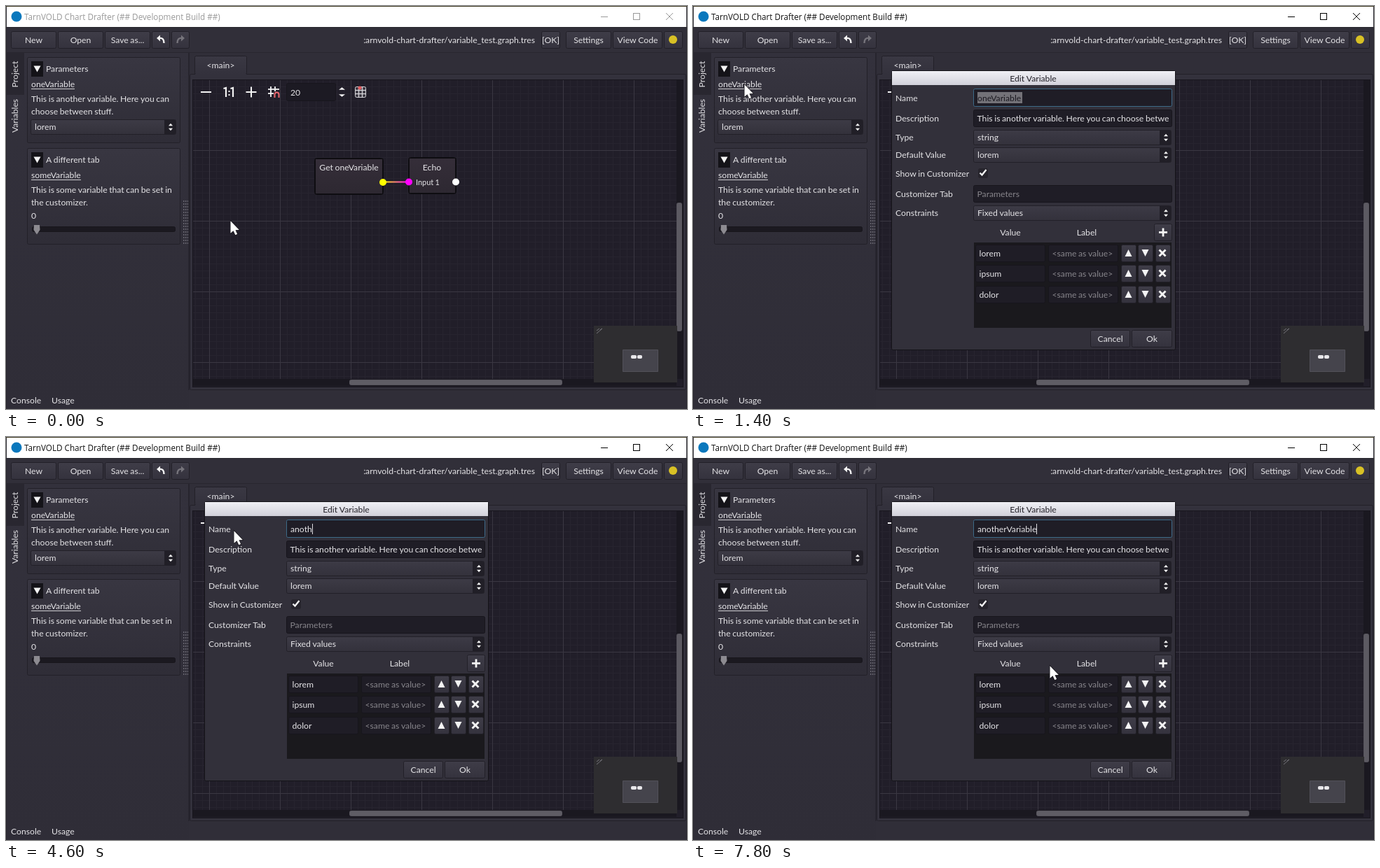
These frames come from a looping animation (972 px wide and 576 px high, 8000 ms). An HTML page with a canvas:

```html
<!DOCTYPE html>
<html lang="en">
<head>
<meta charset="utf-8">
<title>Edit Variable</title>
<style>
html, body { margin: 0; width: 100%; height: 100%; overflow: hidden; background: #302e37; }
canvas { display: block; }
</style>
</head>
<body>
<canvas id="stage" width="972" height="576"></canvas>
<script>
const ctx = document.getElementById('stage').getContext('2d');
const LOOP = 8000;
const LATO = 'Lato, sans-serif';
const C = {
  text: '#e4e3e6', dim: '#87858b', white: '#f4f4f4', bg: '#302e38', panel: '#33313c',
  edge: '#222028', field: '#1f1d26', graph: '#211e29'
};

// [time, value] steps
const MOUSE = [
  [0, [320, 307]], [200, [256, 268]], [400, [115, 157]], [600, [76, 119]],
  [800, [73, 112]], [1800, [102, 120]], [2000, [325, 134]],
  [7400, [330, 139]], [7600, [399, 224]], [7800, [509, 327]]
];
const TYPED = [
  [2200, 1], [2800, 2], [3600, 3], [4200, 4], [4600, 5], [4800, 8],
  [5200, 9], [6600, 10], [7000, 11], [7200, 12], [7400, 15]
];
const NEW_NAME = 'anotherVariable';

function stepAt(steps, t) {
  let value = null;
  for (const [time, v] of steps) if (t >= time) value = v;
  return value;
}

function rect(x, y, w, h, fill) {
  ctx.fillStyle = fill;
  ctx.fillRect(x, y, w, h);
}

function box(x, y, w, h, fill, border = C.edge, r = 2) {
  ctx.beginPath();
  ctx.roundRect(x + .5, y + .5, w - 1, h - 1, r);
  ctx.fillStyle = fill;
  ctx.fill();
  ctx.strokeStyle = border;
  ctx.lineWidth = 1;
  ctx.stroke();
}

function fade(y, h, top, bottom) {
  const g = ctx.createLinearGradient(0, y, 0, y + h);
  g.addColorStop(0, top);
  g.addColorStop(1, bottom);
  return g;
}

function text(str, x, y, color = C.text, align = 'left', size = 12.2, font = LATO) {
  ctx.font = `${size}px ${font}`;
  ctx.wordSpacing = font === LATO ? '-0.5px' : '0px';
  ctx.textAlign = align;
  ctx.fillStyle = color;
  ctx.fillText(str, x, y);
}

function line(points, color, width = 1, close = false) {
  ctx.beginPath();
  points.forEach(([x, y], i) => i ? ctx.lineTo(x, y) : ctx.moveTo(x, y));
  if (close) ctx.closePath();
  ctx.strokeStyle = color;
  ctx.lineWidth = width;
  ctx.stroke();
}

function poly(points, color) {
  ctx.beginPath();
  points.forEach(([x, y]) => ctx.lineTo(x, y));
  ctx.closePath();
  ctx.fillStyle = color;
  ctx.fill();
}

function dot(x, y, r, color) {
  ctx.beginPath();
  ctx.arc(x, y, r, 0, Math.PI * 2);
  ctx.fillStyle = color;
  ctx.fill();
}

// dir 1 points down, -1 up
function triangle(x, y, w, h, dir, color = C.white) {
  poly([[x - w, y - h * dir], [x + w, y - h * dir], [x, y + h * dir]], color);
}

function plus(x, y, r, width = 2) {
  line([[x - r, y], [x + r, y]], C.white, width);
  line([[x, y - r], [x, y + r]], C.white, width);
}

function button(x, y, w, h, label) {
  box(x, y, w, h, fade(y, h, '#3f3d48', '#34323d'));
  if (label) text(label, x + w / 2, y + h / 2 + 4, C.text, 'center');
}

function spinArrows(x, y, w = 3, gap = 3.5) {
  triangle(x, y - gap, w, 1.8, -1);
  triangle(x, y + gap, w, 1.8, 1);
}

function dropdown(x, y, w, h, label) {
  box(x, y, w, h, fade(y, h, '#3d3b46', '#33313b'));
  rect(x + w - 17, y + 1, 16, h - 2, '#211f27');
  spinArrows(x + w - 8, y + h / 2);
  text(label, x + 6, y + h / 2 + 4);
}

function titleBar(active) {
  const ink = active ? '#000' : '#999';
  rect(0, 0, 972, 1, '#403a22');
  rect(1, 1, 970, 29, '#fff');
  dot(15, 15, 7.5, '#0a78bd');
  text('TarnVOLD Chart Drafter (## Development Build ##)', 26, 20, active ? '#111' : '#999',
    'left', 11.7, '"Open Sans", sans-serif');
  line([[849, 15.5], [859, 15.5]], ink);
  ctx.strokeRect(895.5, 10.5, 9, 9);
  line([[942, 10], [952, 20]], ink);
  line([[952, 10], [942, 20]], ink);
}

function curvedArrow(x, dir, color) {
  poly([[x - 6 * dir, 46], [x - dir, 41.5], [x - dir, 50.5]], color);
  ctx.beginPath();
  ctx.moveTo(x - 2 * dir, 46);
  ctx.quadraticCurveTo(x + 4.5 * dir, 45, x + 4.5 * dir, 53);
  ctx.strokeStyle = color;
  ctx.lineWidth = 2.4;
  ctx.stroke();
}

function toolbar() {
  rect(1, 30, 970, 37, '#312f39');
  rect(1, 30, 970, 1, '#25232a');
  rect(1, 66, 970, 1, '#28262f');
  button(7, 36, 65, 25, 'New');
  button(74, 36, 65, 25, 'Open');
  button(141, 36, 65, 25, 'Save as...');
  button(208, 36, 26, 25);
  button(236, 36, 26, 25);
  curvedArrow(221, 1, C.white);
  curvedArrow(249, -1, '#77757c');
  ctx.save();
  ctx.beginPath();
  ctx.rect(511, 36, 250, 26);
  ctx.clip();
  text('/tarnvold-chart-drafter/variable_test.graph.tres', 755, 53, C.text, 'right');
  ctx.restore();
  button(764, 36, 27, 25, '[OK]');
  button(799, 36, 65, 25, 'Settings');
  button(866, 36, 71, 25, 'View Code');
  button(939, 36, 27, 25);
  dot(952, 48, 6, '#d8c125');
}

function section(y, h, title) {
  box(30, y, 219, h, fade(y, h, '#383641', '#2f2d37'));
  rect(36, y + 6, 17, 22, '#141318');
  triangle(44.5, y + 17, 5, 4.5, 1);
  text(title, 57, y + 21);
}

function link(str, y) {
  text(str, 36, y);
  rect(36, y + 2, Math.round(ctx.measureText(str).width), 1, '#cfced2');
}

function sideTab(str, y) {
  ctx.save();
  ctx.translate(17, y);
  ctx.rotate(-Math.PI / 2);
  text(str, 0, 0, C.text, 'center');
  ctx.restore();
}

function sidebar() {
  rect(1, 67, 260, 509, fade(67, 509, '#33313c', '#2f2d37'));
  rect(1, 67, 25, 60, '#292730');
  sideTab('Project', 97.5);
  sideTab('Variables', 157);

  section(73, 123, 'Parameters');
  link('oneVariable', 116);
  text('This is another variable. Here you can', 36, 137);
  text('choose between stuff.', 36, 155);
  dropdown(35, 162, 208, 22, 'lorem');

  section(203, 138, 'A different tab');
  link('someVariable', 246);
  text('This is some variable that can be set in', 36, 267);
  text('the customizer.', 36, 285);
  text('0', 36, 304);
  box(37, 315, 205, 8, '#1b1920', '#18161c');
  poly([[40, 313], [48, 313], [48.5, 320], [44, 326.5], [39.5, 320]], '#8d8b91');

  for (let y = 278; y < 342; y += 4)
    for (let x = 253; x < 260; x += 3) rect(x, y, 1.5, 2, '#696771');

  text('Console', 7, 568);
  text('Usage', 65, 568);
}

function grid() {
  const cell = 10.1;
  for (const major of [false, true]) {
    const step = major ? cell * 10 : cell;
    const color = major ? '#3a3742' : '#27242f';
    for (let x = 290 - (major ? 0 : cell * 2); x < 957; x += step) rect(Math.round(x), 106, 1, 427, color);
    for (let y = 206 - (major ? 0 : cell * 9); y < 533; y += step) rect(267, Math.round(y), 690, 1, color);
  }
}

function node(x, y, w, h, title, titleX) {
  box(x, y, w, h, fade(y, h, '#352e39', '#2d2831'), '#0e0d11', 3);
  ctx.strokeRect(x + 1.5, y + 1.5, w - 3, h - 3);
  text(title, titleX, 235, C.text, 'center');
}

function graphIcons() {
  rect(278, 122, 15, 2, C.white);
  plus(350, 123, 7.5);

  // 1:1 zoom
  for (const x of [314, 324]) line([[x - 3.5, 118], [x, 117], [x, 130]], C.white, 2.2);
  for (const y of [121, 126]) rect(317.5, y, 2, 2, C.white);

  // snap grid with magnet
  for (const p of [378, 384]) line([[p, 115], [p, 130]], C.white, 1.8);
  for (const p of [119, 125]) line([[374, p], [390, p]], C.white, 1.8);
  rect(382, 122, 9, 9, C.graph);
  ctx.beginPath();
  ctx.moveTo(383.5, 131);
  ctx.lineTo(383.5, 126.5);
  ctx.arc(386.5, 126.5, 3, Math.PI, 0);
  ctx.lineTo(389.5, 131);
  ctx.strokeStyle = '#ed6870';
  ctx.lineWidth = 2;
  ctx.stroke();

  box(400, 110, 71, 26, '#1c1a23', '#18161d');
  text('20', 406, 127.5);
  spinArrows(479.5, 123, 4.5, 5);

  // map icon
  box(498, 115, 16, 16, '#3a3741', '#d8d7da');
  for (const x of [503.5, 508.5]) line([[x, 115], [x, 131]], '#d8d7da', 1.3);
  for (const y of [120.5, 125.5]) line([[498, y], [514, y]], '#d8d7da', 1.3);
  dot(505, 117, 2.5, '#e65f62');
}

function graphArea() {
  rect(261, 67, 710, 509, C.bg);
  rect(260, 67, 2, 482, '#27252e');
  box(262, 97, 709, 452, C.panel);
  box(269, 71, 75, 27, fade(71, 27, '#3a3843', C.panel));
  rect(270, 97, 73, 2, C.panel);
  text('<main>', 306.5, 89, C.text, 'center');

  rect(266, 105, 701, 440, '#18161d');
  rect(267, 106, 699, 438, C.graph);
  grid();

  const wire = ctx.createLinearGradient(538, 0, 575, 0);
  wire.addColorStop(0, '#ffff00');
  wire.addColorStop(1, '#ff00ff');
  node(440, 217, 99, 53, 'Get oneVariable', 489.5);
  node(574, 216, 69, 53, 'Echo', 608);
  line([[538, 251.5], [575, 251.5]], wire, 1.8);
  dot(538, 252, 5, '#ffff00');
  dot(575, 251.5, 5, '#ff00ff');
  dot(642, 251.5, 5, '#fff');
  text('Input 1', 585, 255.5, C.text, 'left', 10.9);

  graphIcons();

  rect(957, 106, 9, 427, '#1a1820');
  rect(267, 533, 690, 10, '#1a1820');
  box(957, 281, 8, 184, '#5c5a62', '#56545c');
  box(490, 534, 304, 8, '#5f5d65', '#58565e');

  rect(839, 457, 119, 81, '#2e2d30');
  for (const d of [0, 5]) line([[843 + d, 468 - d], [851, 461]], '#74737a');
  line([[843, 464], [847, 461]], '#74737a');
  box(880, 491, 51, 32, '#45444c', '#525159', 0);
  box(892, 499, 8, 5, '#e8e7ea', '#e8e7ea', 1);
  box(901, 499, 7, 5, '#e8e7ea', '#e8e7ea', 1);
}

function input(x, y, w, h, label, color = C.text) {
  box(x, y, w, h, C.field, '#17151c');
  ctx.save();
  ctx.beginPath();
  ctx.rect(x + 4, y, w - 9, h);
  ctx.clip();
  text(label, x + 5.5, y + h / 2 + 4.5, color);
  ctx.restore();
}

function nameField(t) {
  box(400, 118, 284, 26, C.field, '#3d6a88');
  const count = stepAt(TYPED, t);
  if (!count) {
    rect(406, 123, 64, 16, '#737278');
    text('oneVariable', 406, 135.5, '#1b1920');
    return;
  }
  const typed = NEW_NAME.slice(0, count);
  text(typed, 406, 135.5);
  rect(406 + Math.round(ctx.measureText(typed).width), 124, 1, 15, '#dddce0');
}

function valueRow(y, value) {
  input(403, y, 100, 25, value);
  input(507, y, 100, 25, '<same as value>', C.dim);
  for (const x of [611, 635, 660]) button(x, y, 22, 25);
  triangle(621.5, y + 12, 5, 5, -1);
  triangle(645.5, y + 12, 5, 5, 1);
  line([[665.5, y + 7.5], [674.5, y + 16.5]], C.white, 2.8);
  line([[674.5, y + 7.5], [665.5, y + 16.5]], C.white, 2.8);
}

function dialog(t) {
  box(283, 92, 406, 400, '#32303a', '#141318');
  rect(284, 93, 404, 20, fade(93, 20, '#f0f0f5', '#d2d1da'));
  text('Edit Variable', 485.5, 108, '#24222a', 'center');

  const labels = [['Name', 136], ['Description', 165], ['Type', 192], ['Default Value', 217],
    ['Show in Customizer', 244], ['Customizer Tab', 273], ['Constraints', 300]];
  for (const [label, y] of labels) text(label, 289, y);

  nameField(t);
  input(400, 148, 284, 25, 'This is another variable. Here you can choose between stuff.');
  dropdown(400, 177, 283, 22, 'string');
  dropdown(400, 202, 283, 22, 'lorem');
  box(407, 232, 14, 14, '#26242c', '#26242c');
  line([[409.5, 238.5], [412.5, 241.5], [418.5, 234]], C.white, 2.4);
  input(400, 256, 284, 25, 'Parameters', C.dim);
  dropdown(400, 285, 283, 22, 'Fixed values');

  text('Value', 453, 328, C.text, 'center');
  text('Label', 562, 328, C.text, 'center');
  button(658, 311, 26, 25);
  plus(671, 323.5, 6, 2.8);
  rect(401, 338, 282, 122, '#1a191d');
  ['lorem', 'ipsum', 'dolor'].forEach((value, i) => valueRow(Math.round(341 + i * 29.3), value));

  button(567, 463, 57, 25, 'Cancel');
  button(626, 463, 58, 25, 'Ok');
}

function arrowCursor(x, y) {
  const shape = [[0, 0], [0, 17.5], [4, 14], [6.8, 20], [9.6, 18.8], [7, 13], [12.3, 12.6]]
    .map(([dx, dy]) => [x + dx + .5, y + dy + .3]);
  line(shape, '#18161c', 1.4, true);
  poly(shape, '#fff');
}

function handCursor(x, y) {
  ctx.beginPath();
  ctx.roundRect(x - 2, y, 4, 14, 2);
  ctx.roundRect(x - 1, y + 6, 11, 13, 3);
  ctx.moveTo(x - 1, y + 14);
  ctx.lineTo(x - 4.5, y + 10);
  ctx.lineTo(x - 6, y + 11.5);
  ctx.lineTo(x, y + 19.5);
  ctx.lineTo(x + 8, y + 19.5);
  ctx.lineTo(x + 8, y + 14);
  ctx.closePath();
  ctx.strokeStyle = '#18161c';
  ctx.lineWidth = 1.4;
  ctx.stroke();
  ctx.fillStyle = '#fff';
  ctx.fill();
  for (const d of [3, 6]) line([[x + d, y + 7], [x + d, y + 11]], '#55535a', .8);
}

function draw(t) {
  rect(0, 0, 972, 576, '#25232b');
  sidebar();
  graphArea();
  toolbar();
  titleBar(t >= 1200);
  if (t >= 1400) dialog(t);
  if (t >= 1200 && t < 1400) handCursor(73.5, 113);
  else arrowCursor(...stepAt(MOUSE, t));
}

const start = performance.now();
function tick() {
  draw((performance.now() - start) % LOOP);
  requestAnimationFrame(tick);
}
tick();
</script>
</body>
</html>
```
